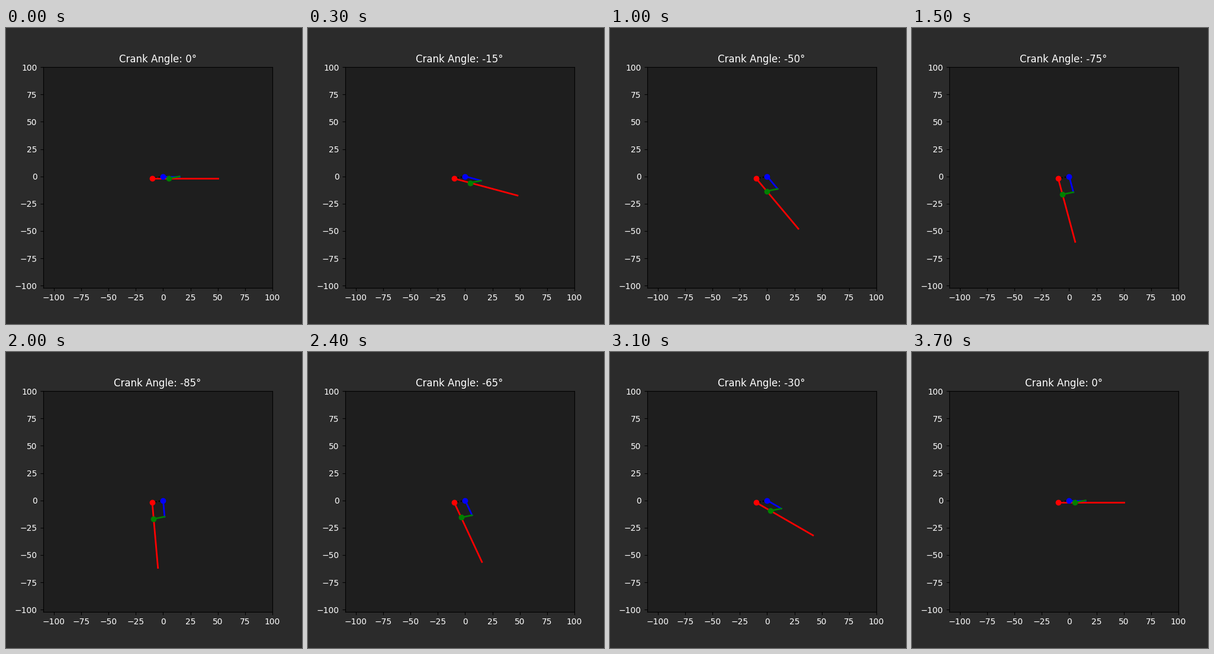
Write a matplotlib script that moves like this. It is 500x500 px and loops after 3.8 s.

```python
import numpy as np
import matplotlib.pyplot as plt
from matplotlib.animation import FuncAnimation

FRAMES = 38
STEP = 5
CRANK, ROCKER = 15, 60
CRANK_PIVOT = np.array([0.0, 0.0])
ROCKER_PIVOT = np.array([-10.0, -2.0])

fig, ax = plt.subplots(figsize=(5, 5), dpi=100)
fig.set_facecolor("#2b2b2b")
ax.set_facecolor("#1e1e1e")
ax.set_aspect("equal")
ax.set_xlim(-110, 100)
ax.set_ylim(-102, 100)
ax.tick_params(labelcolor="white")
title = ax.set_title("", color="white")


def link(color):
    return ax.plot([], [], color=color, lw=2)[0]


def joint(color):
    return ax.plot([], [], "o", color=color)[0]


def place(line, *points):
    line.set_data(*np.transpose(points))


ground = ax.plot([], [], "k:", lw=1.5)[0]
rocker, crank, coupler = link("red"), link("blue"), link("green")
rocker_dot, crank_dot, coupler_dot = joint("red"), joint("blue"), joint("green")

place(ground, ROCKER_PIVOT, CRANK_PIVOT)
place(rocker_dot, ROCKER_PIVOT)
place(crank_dot, CRANK_PIVOT)


def update(i):
    # Swing down to -90 degrees, rest one frame, and swing back
    angle = -STEP * min(i, FRAMES - 1 - i)
    a = np.radians(angle)
    arm = np.array([np.cos(a), np.sin(a)])
    tip = CRANK_PIVOT + CRANK * arm
    pin = ROCKER_PIVOT + CRANK * arm
    place(crank, CRANK_PIVOT, tip)
    place(coupler, tip, pin)
    place(rocker, ROCKER_PIVOT, ROCKER_PIVOT + ROCKER * arm)
    place(coupler_dot, pin)
    title.set_text(f"Crank Angle: {angle}°")
    return rocker, crank, coupler, coupler_dot, title


anim = FuncAnimation(fig, update, frames=FRAMES, interval=100,
                     repeat=True, repeat_delay=0, blit=False)
plt.show()
```
